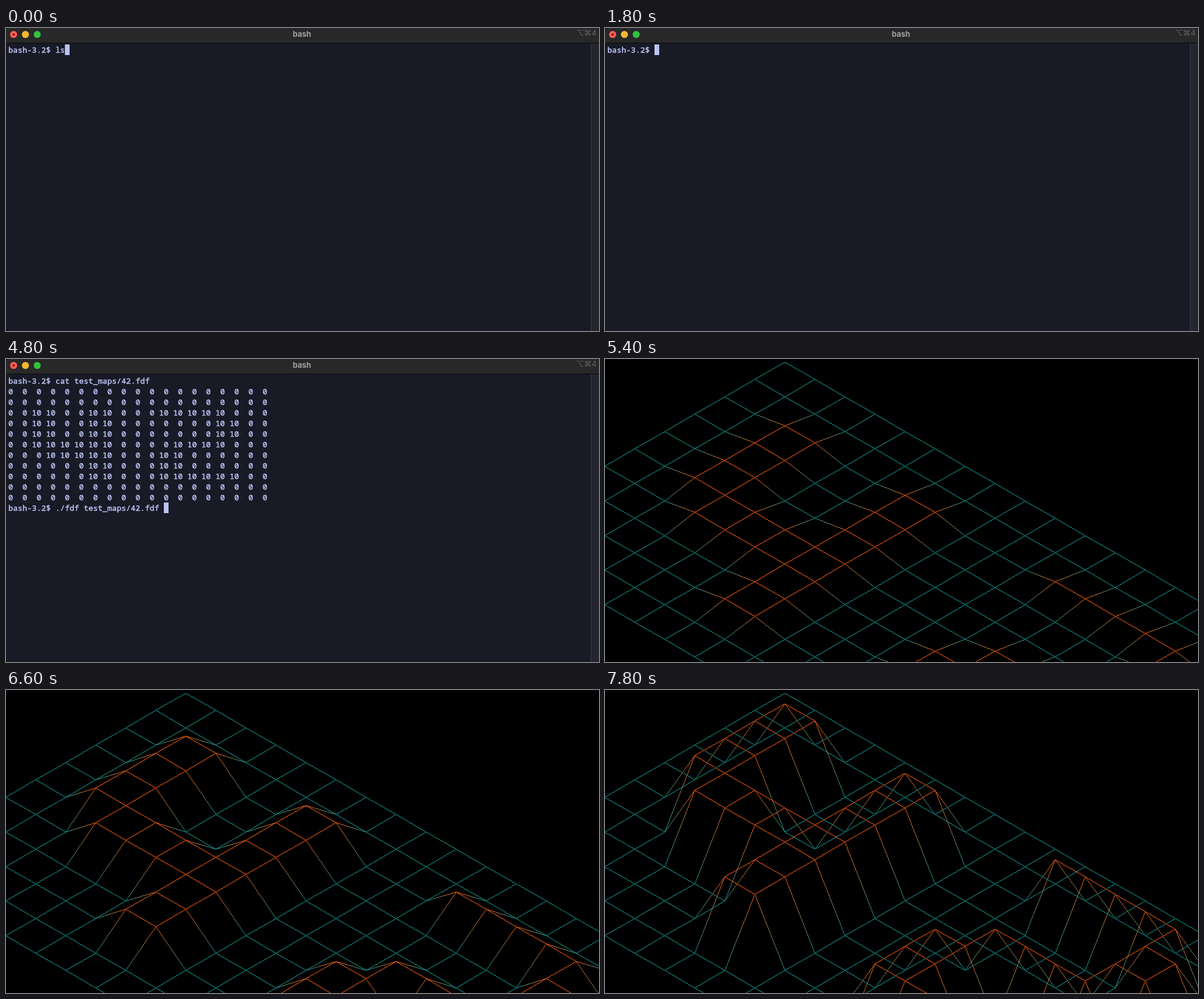
An HTML page with a canvas that plays this animation: 1007x515 px, repeating every 8000 ms.

```html
<!DOCTYPE html>
<html lang="en">
<head>
<meta charset="utf-8">
<title>Wireframe terminal demo</title>
<style>
  html, body { margin: 0; width: 100%; height: 100%; overflow: hidden; background: #000; }
  canvas { display: block; }
</style>
</head>
<body>
<canvas id="stage" width="1007" height="515"></canvas>
<script>
const W = 1007, H = 515, LOOP = 8000, STEP = 600;
const ctx = document.getElementById('stage').getContext('2d');
const PROMPT = 'bash-3.2$ ';

const flat = '0'.repeat(19);
const map = [
  flat, flat,
  '0011001100011111000',
  '0011001100000001100',
  '0011001100000001100',
  '0011111100001111000',
  '0001111100011000000',
  '0000001100011000000',
  '0000001100011111100',
  flat, flat
].map(row => [...row].map(Number));

const files = ('10-2 10-70 100-6 20-60 42 50-4 basictest elem-col elem-fract elem elem2 ' +
  'julia mars pentenegpos plat pnp_flat pylone pyra pyramide t1 t2').split(' ').map(n => n + '.fdf');
const folder = ['Makefile', 'README.md', 'fdf', 'includes', 'libft', 'src'];

const listing = [
  PROMPT + 'ls',
  folder.map(n => n.padEnd(13)).join('').padEnd(81) + 'test_maps',
  PROMPT + 'ls test_maps/',
  ...Array.from({ length: 14 }, (_, i) => files[i].padEnd(24) + (files[i + 14] || ''))
];
const catCommand = PROMPT + 'cat test_maps/42.fdf ';
const mapText = map.map(row => row.map(v => v ? '10' : ' 0').join(' ').slice(1));
const afterCat = typed => [catCommand, ...mapText, PROMPT + typed];

// The cursor always follows the last line.
const screens = [
  [PROMPT + 'ls'],
  [...listing, PROMPT],
  [...listing, PROMPT + 'clear'],
  [PROMPT],
  [catCommand],
  afterCat(''),
  afterCat('./fdf '),
  afterCat('./fdf test_maps/'),
  afterCat('./fdf test_maps/42.fdf ')
];
const heights = [10, 30, 45, 70, 100];

function rect(x, y, w, h, color) {
  ctx.fillStyle = color;
  ctx.fillRect(x, y, w, h);
}

function dot(x, y, r, color) {
  ctx.fillStyle = color;
  ctx.beginPath();
  ctx.arc(x, y, r, 0, 7);
  ctx.fill();
}

function text(str, x, y, font, color, align = 'left', thicken = 0) {
  ctx.font = font;
  ctx.fillStyle = ctx.strokeStyle = color;
  ctx.textAlign = align;
  ctx.fillText(str, x, y);
  if (thicken) {
    ctx.lineWidth = thicken;
    ctx.lineJoin = 'round';
    ctx.strokeText(str, x, y);
  }
}

function bell(x, y) {
  dot(x, y + 13, 2, '#c98a1c');
  ctx.fillStyle = '#f5c433';
  ctx.beginPath();
  ctx.moveTo(x - 8, y + 12);
  ctx.quadraticCurveTo(x - 5, y + 10, x - 5, y + 6);
  ctx.bezierCurveTo(x - 5, y - 2, x + 5, y - 2, x + 5, y + 6);
  ctx.quadraticCurveTo(x + 5, y + 10, x + 8, y + 12);
  ctx.fill();
}

function drawTerminal(lines, ringing) {
  ctx.save();
  ctx.beginPath();
  ctx.roundRect(0, 0, W, H, 4);
  ctx.clip();
  rect(0, 0, W, H, '#181a26');
  rect(0, 0, W, 25, '#282828');
  rect(0, 25, W, 1, '#08080a');
  rect(993, 26, 14, H - 26, '#24262f');
  rect(993, 26, 1, H - 26, '#393a42');
  ctx.restore();

  dot(13, 11, 6, '#ff5f57');
  dot(13, 11, 2, '#7e0b06');
  dot(33, 11, 6, '#fdb832');
  dot(53, 11, 6, '#2fc23f');
  if (ringing) bell(485, 3);
  text('bash', ringing ? 512.5 : 502.5, 15, 'bold 13px Inter, sans-serif', '#a0a0a0', 'center');
  text('⌥⌘4', 1003, 13, '13px Inter, "DejaVu Sans", sans-serif', '#636363', 'right');

  lines.forEach((line, i) =>
    text(line, 4, 42 + 18 * i, '13.333px "Noto Sans Mono", monospace', '#bcc6f3', 'left', 0.45));
  const last = lines.length - 1;
  rect(4 + 8 * lines[last].length, 28 + 18 * last, 8, 18, '#b9c4f2');
}

const low = [20, 155, 148], high = [255, 95, 15];

function drawLine(a, b) {
  const dx = b.x - a.x, dy = b.y - a.y;
  const n = Math.max(Math.abs(dx), Math.abs(dy));
  for (let i = 0; i <= n; i++) {
    const f = i / n, level = a.v + (b.v - a.v) * f;
    const color = low.map((c, k) => Math.round(c + (high[k] - c) * level));
    rect(Math.round(a.x + dx * f), Math.round(a.y + dy * f), 1, 1, `rgb(${color})`);
  }
}

function drawWireframe(height) {
  rect(0, 0, W, H, '#000');
  const points = map.map((row, r) => row.map((v, c) => ({
    x: 305 + 51 * (c - r),
    y: Math.round(5 + 29.45 * (c + r) - v * height),
    v
  })));
  points.forEach((row, r) => row.forEach((p, c) => {
    if (row[c + 1]) drawLine(p, row[c + 1]);
    if (points[r + 1]) drawLine(p, points[r + 1][c]);
  }));
}

let shown = -1;
function tick() {
  const step = Math.floor(performance.now() % LOOP / STEP);
  if (step !== shown) {
    shown = step;
    rect(0, 0, W, H, '#000');
    if (step < screens.length) drawTerminal(screens[step], step === 1);
    else drawWireframe(heights[step - screens.length]);
  }
  requestAnimationFrame(tick);
}
tick();
</script>
</body>
</html>
```
